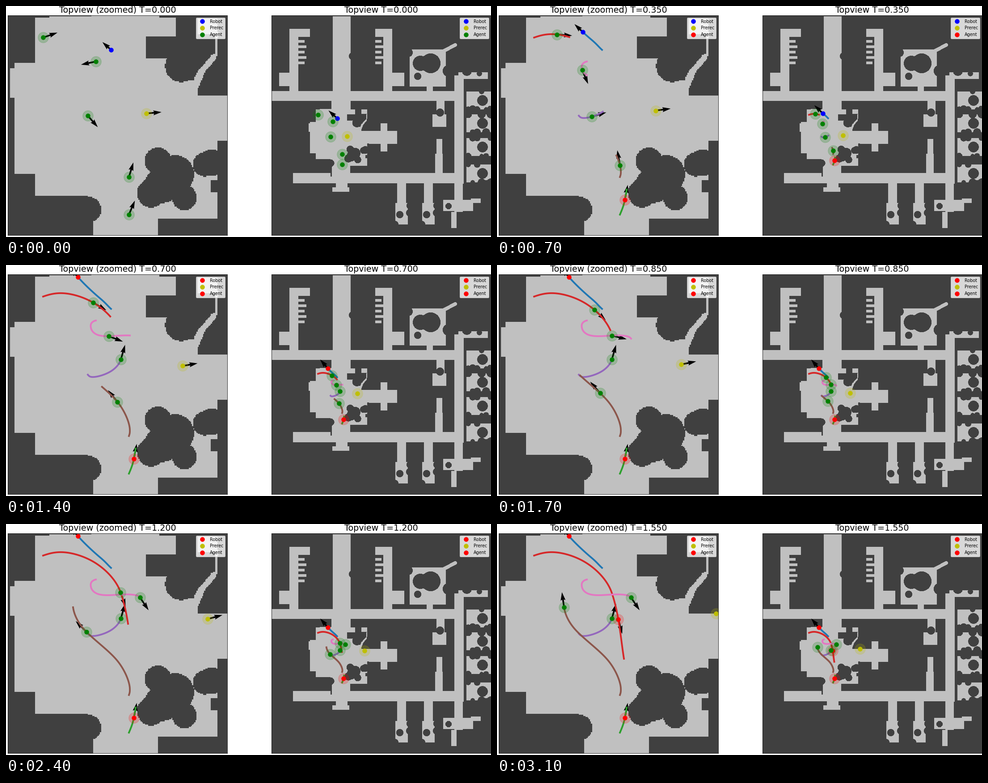
A matplotlib script for the animation above (3.2 s loop, 1085x516 px).

```python
import numpy as np
import matplotlib.pyplot as plt
from matplotlib.animation import FuncAnimation
from matplotlib.lines import Line2D

W, H = 1085, 516
PT = 0.72                      # points per pixel at 100 dpi
TOP, SIDE = 21, 491            # panel top and edge length
ZOOM, SHIFT = 3.56, 674.7 + 223.2j
FRAMES, INTERVAL = 32, 100
DOT, HALO, ARROW_WIDTH = 10.5, 23.5, 3.68

plt.rcParams["font.family"] = "DejaVu Sans"


class FloorMap:
    """Occupancy grid built from rooms, blocks, lanes and discs."""

    def __init__(self, left, cells):
        centres = (np.arange(cells) + 0.5) * SIDE / cells
        gx, gy = np.meshgrid(left + centres, TOP + centres)
        self.grid = gx + 1j * gy
        self.free = np.zeros(gx.shape, bool)
        self.view()

    def view(self, scale=1, shift=0):
        self.z = (self.grid - shift) * scale

    def room(self, x0, y0, x1, y1, free=True):
        x, y = self.z.real, self.z.imag
        self.free[(x >= x0) & (x < x1) & (y >= y0) & (y < y1)] = free

    def block(self, *box):
        self.room(*box, free=False)

    def disc(self, x, y, r):
        self.free[np.abs(self.z - complex(x, y)) < r] = False

    def lane(self, start, end, width):
        along = end - start
        u = ((self.z - start) * np.conj(along)).real / abs(along) ** 2
        gap = np.abs(self.z - start - np.clip(u, 0, 1) * along)
        self.free[gap < width / 2] = True


def paint_hall(m):
    m.room(66, 27, 379, 423)
    m.room(97, 24, 190, 30)
    m.room(190, -50, 343, 30)
    m.room(9, 138, 70, 205)
    m.room(19, 127, 70, 375)
    m.room(340, 199, 502, 300)
    m.room(340, 300, 473, 476)
    m.room(183, 420, 340, 560)
    m.room(375, 165, 428, 200)
    m.room(429, 29, 473, 62)
    m.lane(422 + 182j, 436 + 148j, 16)
    m.lane(436 + 148j, 465 + 114j, 13)
    m.lane(470 + 110j, 472 + 60j, 5)

    m.disc(184, 455, 29)
    m.block(183, 470, 195, 560)
    m.block(313, 67, 380, 116)
    m.disc(392, 134, 36)
    m.disc(445, 354, 27)
    m.disc(460, 350, 30)
    m.block(459, 390, 473, 416)
    m.disc(340, 346, 30)
    m.disc(378, 376, 43)
    m.disc(350, 400, 40)
    m.disc(325, 418, 32)
    m.disc(399, 428, 28)


def paint_corridors(m):
    m.room(594, 190, 1024, 212)
    m.room(731, 23, 771, 230)
    m.room(1003, 155, 1024, 397)
    m.room(642, 373, 1024, 396)
    m.room(738, 396, 764, 405)
    m.room(730, 405, 768, 415)
    m.room(812, 279, 875, 308)
    m.room(838, 262, 853, 325)
    m.disc(775, 112, 8)


def paint_upper_rooms(m):
    for x, shelf, foot in [(634, 654, 611), (844, 826, 849)]:
        m.room(x, 51, x + 20, 191)
        m.room(min(x, shelf), 51, max(x + 20, shelf + 26), 69)
        m.room(foot, 149, foot + 42, 179)
        for y in range(76, 130, 12):
            m.room(shelf, y, shelf + 18 - y % 8, y + 6)

    m.room(903, 97, 984, 180)
    m.room(941, 175, 955, 192)
    m.lane(980 + 100j, 1005 + 87j, 8)
    for x, y, r in [(927, 128, 17), (950, 128, 22), (921, 157, 8),
                    (900, 104, 10), (990, 145, 13)]:
        m.disc(x, y, r)


def paint_side_rooms(m):
    m.room(963, 212, 981, 245)
    m.room(954, 242, 985, 270)
    m.disc(971, 238, 9)
    m.room(963, 297, 976, 330)
    m.room(960, 330, 977, 374)

    rng = np.random.default_rng(4)
    m.room(1012, 148, 1078, 163)
    m.disc(1031, 145, 11)
    m.disc(1059, 151, 6)
    for y in (211, 262, 315, 374):
        m.room(1030, y - 20, W, y + 20)
        m.disc(1066, y, 12)
        for x in range(1034, W, 10):
            m.disc(x, y + rng.choice([-20, 20]), rng.uniform(4, 9))


def paint_lower_rooms(m):
    for x in (886, 946):
        m.room(x - 11, 396, x + 9, 440)
        m.room(x - 15, 440, x + 13, 488)
        for dx, dy in [(-5, 18), (17, 14), (-16, 40), (4, 52), (18, -2)]:
            m.disc(x + dx, 448 + dy, 8)
    m.room(1003, 396, 1022, 460)
    m.room(996, 460, 1008, 496)
    m.room(978, 433, 1045, 458)
    m.room(1040, 430, 1062, 440)
    m.disc(990, 447, 7)


class Track:
    """Hermite path through (frame, x, y, heading in degrees) keys."""

    def __init__(self, *keys, stop=FRAMES):
        self.t, x, y, self.deg = np.array(keys, float).T
        self.z, self.stop = x + 1j * y, stop
        pace = np.abs(np.diff(self.z)) / np.diff(self.t)
        speed = (np.r_[pace[0], pace] + np.r_[pace, pace[-1]]) / 2
        self.v = speed * np.exp(1j * np.radians(self.deg))

    def at(self, t):
        t = np.clip(t, self.t[0], self.t[-1])
        i = np.clip(np.searchsorted(self.t, t, "right") - 1, 0, len(self.t) - 2)
        h = self.t[i + 1] - self.t[i]
        u = (t - self.t[i]) / h
        return ((1 + 2 * u) * (1 - u) ** 2 * self.z[i]
                + u * (1 - u) ** 2 * h * self.v[i]
                + u * u * (3 - 2 * u) * self.z[i + 1]
                + u * u * (u - 1) * h * self.v[i + 1])

    def direction(self, t):
        return np.exp(1j * np.radians(np.interp(t, self.t, self.deg)))


robot = Track((0, 235, 98, -138), (5, 211, 75, -140), (10, 161, 27, -131), stop=10)
prerec = Track((0, 314, 240, -5), (14, 395, 225.5, -10), (31, 490, 200, -19))
agents = [
    Track((0, 275, 466, -67), (5, 286, 433, -79), (7.5, 290, 410, -83), stop=5),
    Track((0, 83, 70.5, -19), (5, 117.5, 63, -3), (14, 195, 84, 30),
          (24, 256.5, 153, 71), (41.3, 284, 301, 81), stop=31),
    Track((0, 183, 245, 49), (5, 198, 250, -5), (10, 236, 236.5, -33),
          (13.5, 257, 211, -74)),
    Track((0, 275, 382, -73), (5, 277, 367.5, -92), (14, 249.5, 306, -129),
          (24, 180, 241, -135), (31, 150, 186, -98)),
    Track((0, 201, 124, 168), (5, 189.5, 135, 92), (10, 200.5, 154, 30),
          (20, 284, 158, 7), (22, 300, 164.5, 56)),
]
actors = [robot, prerec] + agents
base_colors = ["b", "y"] + ["g"] * len(agents)


def trail_end(actor, n):
    """Trails run ahead of the agents; the robot's ends at the robot."""
    if n == 0 or actor is prerec:
        return 0
    n = min(n, actor.stop)
    return n if actor is robot else 1.3 * n + 1


def dot(color, size=DOT, **kw):
    kw = {"markeredgewidth": 0, **kw}
    return Line2D([], [], ls="none", marker="o", color=color,
                  markersize=size * PT, **kw)


class Panel:
    def __init__(self, left, title, floor, with_arrows, scale=1, shift=0j):
        self.title, self.scale, self.shift = title, scale, shift
        bottom = TOP + SIDE
        self.ax = ax = fig.add_axes([left / W, 1 - bottom / H, SIDE / W, SIDE / H])
        shade = np.where(floor.free, 192, 64).astype(np.uint8)
        ax.imshow(shade, cmap="gray", vmin=0, vmax=255, aspect="auto",
                  interpolation="nearest", extent=(left, left + SIDE, bottom, TOP))
        ax.set(xlim=(left, left + SIDE), ylim=(bottom, TOP), xticks=[], yticks=[])
        for spine in ax.spines.values():
            spine.set_linewidth(0.8 * PT)
        self.text = ax.set_title("", fontsize=19.2 * PT, pad=6 * PT)

        self.trails, self.halos, self.dots, self.arrows = [], [], [], []
        for k, actor in enumerate(actors):
            self.trails += ax.plot([], [], color=f"C{k}", lw=3.84 * PT)
        for actor, color in zip(actors, base_colors):
            halo = dot(color, HALO, alpha=0.2, markeredgewidth=0.96 * PT)
            halo.set_visible(actor is not robot)
            self.halos.append(ax.add_line(halo))
            self.dots.append(ax.add_line(dot(color)))
            arrow = ax.quiver(left, TOP, 1, 1, angles="xy", scale_units="xy",
                              scale=1, units="dots", width=ARROW_WIDTH)
            arrow.set_visible(with_arrows or actor is robot)
            self.arrows.append(arrow)

        handles = [dot(c) for c in "byg"]
        self.legend = ax.legend(handles, ["Robot", "Prerec", "Agent"],
                                loc="upper right", fontsize=9.6 * PT)
        self.legend.get_frame().set_linewidth(PT)

    def place(self, z):
        return z / self.scale + self.shift

    def draw(self, n):
        self.text.set_text(f"{self.title} T={n * 0.05:.3f}")
        for k, actor in enumerate(actors):
            t = min(n, actor.stop)
            z = self.place(actor.at(t))
            color = "r" if n >= actor.stop else base_colors[k]
            for marker in (self.halos[k], self.dots[k]):
                marker.set_data([z.real], [z.imag])
                marker.set_color(color)
            span = np.linspace(0, trail_end(actor, n), 120)
            path = self.place(actor.at(span))
            self.trails[k].set_data(path.real, path.imag)
            self.trails[k].set_visible(span[-1] > 0)
            vec = actor.direction(t) * (26 if actor is robot else 34)
            self.arrows[k].set_offsets([[z.real, z.imag]])
            self.arrows[k].set_UVC([vec.real], [vec.imag])
        for handle, marker in zip(self.legend.legend_handles, self.dots):
            handle.set_color(marker.get_color())


near = FloorMap(4, 200)
paint_hall(near)

far = FloorMap(594, SIDE)
paint_corridors(far)
far.view(ZOOM, SHIFT)
paint_hall(far)
far.view()
for paint in (paint_upper_rooms, paint_side_rooms, paint_lower_rooms):
    paint(far)

fig = plt.figure(figsize=(W / 100, H / 100), dpi=100, facecolor="white")
panels = [Panel(4, "Topview (zoomed)", near, True),
          Panel(594, "Topview", far, False, ZOOM, SHIFT)]


def update(n):
    for panel in panels:
        panel.draw(n)
    return []


anim = FuncAnimation(fig, update, frames=FRAMES, interval=INTERVAL,
                     repeat=True, repeat_delay=0, blit=False)
plt.show()
```
